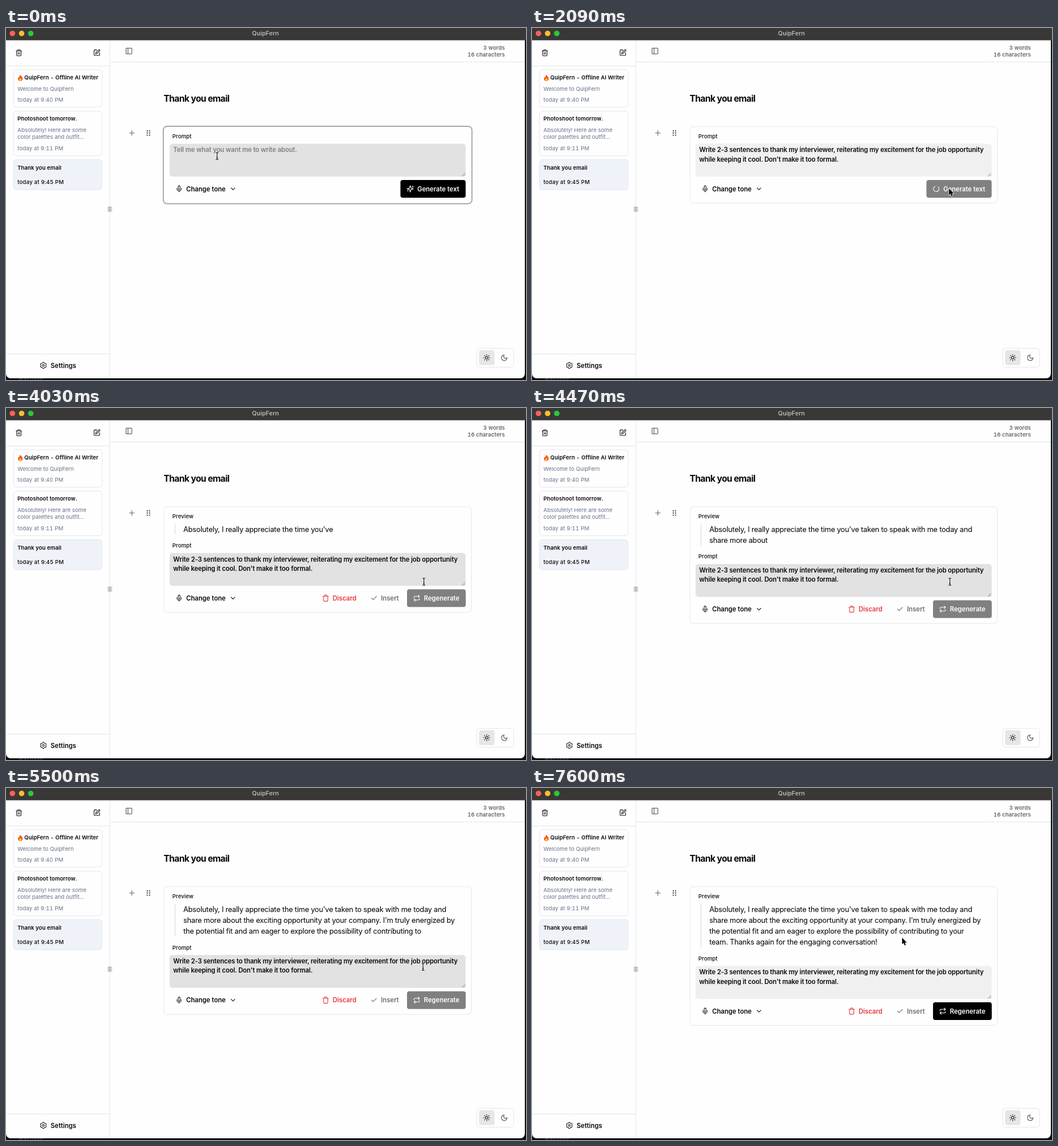
These frames come from a looping animation (909x616 px, 8000 ms). An HTML page:

```html
<!DOCTYPE html>
<html lang="en">
<head>
<meta charset="utf-8">
<title>QuipFern</title>
<style>
html, body { margin: 0; width: 100%; height: 100%; overflow: hidden; background: #111; }
svg { display: block; width: 100%; height: 100%; }
text { font-family: Inter, "Open Sans", sans-serif; white-space: pre; }
.small { font-size: 9.6px; letter-spacing: .004em; }
.time { font-size: 9.6px; letter-spacing: .018em; font-variant-numeric: tabular-nums; }
.label { font-size: 9.6px; font-weight: 500; letter-spacing: .008em; }
.bold { font-size: 9.6px; font-weight: 600; letter-spacing: .004em; font-variant-numeric: tabular-nums; }
.button { font-size: 11.2px; font-weight: 600; }
.field { font-size: 11.26px; font-weight: 600; letter-spacing: -.0123em; }
.reply { font-size: 12.7px; letter-spacing: -.0171em; }
.title { font-size: 15.5px; font-weight: 700; letter-spacing: -.6px; }
.bar { font-size: 10.6px; font-weight: 600; }
.now { font-weight: 500; }
</style>
</head>
<body>
<svg viewBox="0 0 909 616" preserveAspectRatio="none">
  <g id="shell"></g>
  <g id="panel"></g>
  <g id="pointer"></g>
</svg>
<script>
const LOOP = 8000;
const INK = '#0a0a0a', LINE = '#e4e6ea', SLATE = '#64708a', GRAY = '#6d6d6d', RED = '#e5383b';

const REPLY = ("Absolutely, I really appreciate the time you've taken to speak with me today and " +
  "share more about the exciting opportunity at your company. I'm truly energized by " +
  "the potential fit and am eager to explore the possibility of contributing to your " +
  "team. Thanks again for the engaging conversation!").split(' ');
const BREAKS = [0, 14, 27, 41, 48];
const PROMPT = ['Write 2-3 sentences to thank my interviewer, reiterating my excitement for the job opportunity',
  "while keeping it cool. Don't make it too formal."];

// Tracks hold each value until the next time: [time, value...]
const WORDS = [[0, 0], [3730, 2], [3880, 5], [4020, 7], [4170, 10], [4320, 13], [4470, 17], [4620, 20],
  [4770, 23], [4910, 26], [5050, 28], [5200, 32], [5350, 36], [5500, 40], [5650, 43], [5800, 46], [5950, 48]];
const POINTER = [[0, 369, 224, 'beam'], [1040, 412, 235, 'beam'], [1190, 470, 240, 'beam'], [1340, 562, 246, 'beam'],
  [1490, 645, 252, 'beam'], [1640, 702, 270, 'arrow'], [1790, 729, 281, 'arrow'], [3280, 730, 289, 'arrow'],
  [3430, 729, 296, 'arrow'], [3580, 729, 301.5, 'arrow'], [3730, 730.5, 304, 'beam'], [5050, 730.5, 306, 'beam'],
  [5500, 729, 313, 'beam'], [5650, 726, 328, 'beam'], [5800, 720, 350, 'beam'], [5950, 713.5, 371.5, 'arrow'],
  [7450, 662, 287, 'arrow'], [7600, 647, 262, 'arrow']];
const CARET = [[0], [150, 293, 214], [600, 538, 230], [750, 293, 245], [1490], [2090]];

const hold = (track, t) => track.filter(k => k[0] <= t).pop().slice(1);
const text = (x, y, s, cls, fill = INK, anchor = 'start') =>
  `<text x="${x}" y="${y}" class="${cls}" fill="${fill}" text-anchor="${anchor}">${s}</text>`;
const rect = (x, y, w, h, r, fill, stroke = 'none', sw = 1) =>
  `<rect x="${x}" y="${y}" width="${w}" height="${h}" rx="${r}" fill="${fill}" stroke="${stroke}" stroke-width="${sw}"/>`;
const line = (d, color = LINE, sw = 1) => `<path d="${d}" fill="none" stroke="${color}" stroke-width="${sw}"/>`;
const dot = (x, y, r, fill) => `<circle cx="${x}" cy="${y}" r="${r}" fill="${fill}"/>`;
const ring = (x, y, r) => `M${x - r} ${y}a${r} ${r} 0 1 0 ${2 * r} 0a${r} ${r} 0 1 0 ${-2 * r} 0`;

const ICON = {
  trash: 'M3 6h18M19 6v14a2 2 0 0 1-2 2H7a2 2 0 0 1-2-2V6M8 6V4a2 2 0 0 1 2-2h4a2 2 0 0 1 2 2v2M10 11v6M14 11v6',
  bin: 'M3 6h18M19 6v14a2 2 0 0 1-2 2H7a2 2 0 0 1-2-2V6M8 6V4a2 2 0 0 1 2-2h4a2 2 0 0 1 2 2v2',
  edit: 'M12 3H5a2 2 0 0 0-2 2v14a2 2 0 0 0 2 2h14a2 2 0 0 0 2-2v-7M18.4 2.6a2.1 2.1 0 0 1 3 3L12 15l-4 1 1-4Z',
  side: 'M5 3h14a2 2 0 0 1 2 2v14a2 2 0 0 1-2 2H5a2 2 0 0 1-2-2V5a2 2 0 0 1 2-2ZM9 3v18',
  mic: 'M12 2a3 3 0 0 0-3 3v7a3 3 0 0 0 6 0V5a3 3 0 0 0-3-3ZM19 10v2a7 7 0 0 1-14 0v-2M12 19v3',
  down: 'M6 9l6 6 6-6',
  plus: 'M5 12h14M12 5v14',
  check: 'M20 6L9 17l-5-5',
  repeat: 'M17 2l4 4-4 4M3 11v-1a4 4 0 0 1 4-4h14M7 22l-4-4 4-4M21 13v1a4 4 0 0 1-4 4H3',
  spinner: 'M21 12a9 9 0 1 1-6.2-8.56',
  spark: 'M9.9 15.5A2 2 0 0 0 8.5 14.1l-6.1-1.6a.5.5 0 0 1 0-1L8.5 9.9A2 2 0 0 0 9.9 8.5l1.6-6.1a.5.5 0 0 1 1 0L14.1 8.5' +
    'A2 2 0 0 0 15.5 9.9l6.1 1.6a.5.5 0 0 1 0 1L15.5 14.1a2 2 0 0 0-1.4 1.4l-1.6 6.1a.5.5 0 0 1-1 0ZM20 3v4M22 5h-4M4 17v2M5 18H3',
  moon: 'M12 3a6 6 0 0 0 9 9 9 9 0 1 1-9-9Z',
  sun: ring(12, 12, 4) + polar(8, (a, p) => `M${p(8, a)}L${p(10, a)}`),
  gear: ring(12, 12, 3) + 'M' + polar(72, (a, p) => p(8.9 + 1.2 * Math.cos(6 * a), a) + ' ') + 'Z'
};

function polar(n, draw) {
  const point = (r, a) => `${(12 + r * Math.sin(a)).toFixed(2)} ${(12 - r * Math.cos(a)).toFixed(2)}`;
  return Array.from({ length: n }, (_, i) => draw(i * 2 * Math.PI / n, point)).join('');
}

function icon(name, x, y, size = 12.9, color = INK, sw = 2, turn = 0) {
  return `<path d="${ICON[name]}" transform="translate(${x} ${y}) rotate(${turn}) scale(${size / 24}) translate(-12 -12)"
    fill="none" stroke="${color}" stroke-width="${sw}" stroke-linecap="round" stroke-linejoin="round"/>`;
}

function grip(x, y, dx, dy, r, color) {
  let out = '';
  for (let i = 0; i < 6; i++) out += dot(x + (i % 2 - .5) * dx, y + ((i >> 1) - 1) * dy, r, color);
  return out;
}

function shell() {
  const flame = `<path d="M25.4 82c.6 2 3.7 3.6 3.7 6.5a4 4 0 0 1-8.2.2c0-1.7.7-2.7 1.3-3.5.2 1 .6 1.5 1.2 1.7-.3-2 .5-3.8 2-4.9Z" fill="#f4511e"/>
    <path d="M25.3 87c1.3 1.3 2 2.2 2 3.3a2.2 2.2 0 0 1-4.5 0c0-1.2.7-1.8 1.2-2.3.2.5.5.7.8.8 0-.7.1-1.2.5-1.8Z" fill="#ffc02e"/>`;
  return rect(0, 0, 909, 616, 0, '#0d0d0d') +
    text(14, 617, '.. and more', 'small', '#555') +
    '<path d="M0 0H907V605a8 8 0 0 1-8 8H8a8 8 0 0 1-8-8Z" fill="#fefefe"/>' +
    rect(0, 0, 909, 21.5, 0, '#393836') +
    dot(11.3, 9.5, 4.8, '#ff5f57') + dot(27.3, 9.5, 4.8, '#febc2e') + dot(43.3, 9.5, 4.8, '#28c840') +
    text(453.5, 12.8, 'QuipFern', 'bar', '#b8b7b6', 'middle') +
    line('M181.5 22V613M0 66.5H181M182 59.5H907M0 570.5H181') +
    icon('trash', 22.5, 43.3) + icon('edit', 158.8, 43.2) + icon('side', 214.9, 40.3, 13.5, '#444', 1.8) +
    rect(13, 73, 155, 65.5, 5, '#fefefe', LINE) +
    flame + text(32, 90.3, 'QuipFern - Offline AI Writer', 'bold') +
    text(20, 109.5, 'Welcome to QuipFern', 'small', SLATE) +
    text(20, 128.9, 'today at 9:40 PM', 'time', SLATE) +
    rect(13, 145.5, 155, 78, 5, '#fefefe', LINE) +
    text(20, 162.4, 'Photoshoot tomorrow.', 'bold') +
    text(20, 181.6, 'Absolutely! Here are some', 'small', SLATE) +
    text(20, 194.4, 'color palettes and outfit…', 'small', SLATE) +
    text(20, 213.9, 'today at 9:11 PM', 'time', SLATE) +
    rect(13, 230.5, 155, 52.5, 5, '#eff3f9', '#e1e6ee') +
    text(20, 247.5, 'Thank you email', 'bold') +
    text(20, 273, 'today at 9:45 PM', 'time now') +
    rect(177, 311.5, 9, 11, 2, '#e2e6ec') + grip(181.5, 317, 2.6, 2.7, .75, '#444') +
    icon('gear', 65.3, 590.4, 13, INK, 1.9) + text(78, 594.5, 'Settings', 'button') +
    text(872, 37.5, '3 words', 'bold', '#666', 'end') + text(872, 50, '16 characters', 'bold', '#666', 'end') +
    text(275.5, 128.6, 'Thank you email', 'title') +
    icon('plus', 220, 183.8, 14.5, '#666', 1.9) + grip(249, 183.8, 4, 3.8, 1.2, '#555') +
    rect(823, 560.5, 64.5, 33, 5, '#fefefe', LINE) + rect(827, 564, 27, 26, 4, '#e6e6e6') +
    icon('sun', 840.4, 577, 13.2) + icon('moon', 871, 577, 13.2, '#555');
}

function preview(count, rows) {
  let out = text(290.8, 192.7, 'Preview', 'label') + rect(294.7, 202.5, 1.7, rows * 19.25 - .5, 0, LINE);
  for (let i = 0; i < rows; i++)
    out += text(310, 216.6 + i * 19.25, REPLY.slice(BREAKS[i], Math.min(BREAKS[i + 1], count)).join(' '), 'reply', '#000');
  return out;
}

function field(t, mode) {
  const focused = t >= 150 && t < 2090;
  const base = focused ? rect(285.5, 202, 518.5, 58.5, 5, '#fefefe', INK, 1.3)
    : rect(286, 202.5, 517.5, 57.5, 5, mode === 'beam' ? '#e2e2e2' : '#f0f0f0');
  const words = t < 600 ? text(292.3, 217.4, 'Tell me what you want me to write about.', 'field', '#808080')
    : PROMPT.map((s, i) => text(292.3, 217.4 + i * 16.1, s, 'field')).join('');
  const [x, y] = hold(CARET, t);
  return base + words + line('M797 259.5L802.5 254M800.3 259.5L802.5 257.3', '#666', .8) +
    (x ? line(`M${x} ${y - 7}v14`, INK, 1) : '');
}

function actions(t, rows) {
  const y = 281.5, base = 285.5;
  const common = icon('mic', 302.6, y) + text(315, base, 'Change tone', 'button') + icon('down', 396.8, y, 13);
  if (!rows) {
    const busy = t >= 2090, tick = Math.floor((t + 8) / 149) * 149;
    const fill = busy ? '#808080' : t >= 1640 ? '#1d1d1d' : '#000';
    return common + rect(689.5, 266, 114, 31, 4, fill) +
      (busy ? icon('spinner', 706.6, y, 13, '#fff', 2, 130 + (tick - 3576) * .36) : icon('spark', 706.6, y, 12.9, '#fff')) +
      text(719, base, 'Generate text', 'button', '#fff');
  }
  return common + icon('bin', 558.8, y, 12.9, RED) + text(571, base, 'Discard', 'button', RED) +
    icon('check', 643.4, y, 12.9, GRAY) + text(655.5, base, 'Insert', 'button', GRAY) +
    rect(701, 266, 102.7, 31, 4, t < 5950 ? '#808080' : '#000') +
    icon('repeat', 718, y, 12.9, '#fff') + text(730.5, base, 'Regenerate', 'button', '#fff');
}

function panel(t, mode) {
  const [count] = hold(WORDS, t);
  const rows = count ? BREAKS.findIndex(b => b >= count) : 0;
  const drop = rows ? 32 + rows * 19.25 : 0;
  const card = t < 150 ? rect(275, 172, 539.5, 135.5, 6.5, '#fefefe', '#a9a9a9', 2)
    : rect(276, 172.8, 537.5, 133.7 + drop, 6, '#fefefe', LINE);
  return card + (rows ? preview(count, rows) : '') +
    `<g transform="translate(0 ${drop})">` +
    text(290.8, 192.9, 'Prompt', 'label') + field(t, mode) + actions(t, rows) + '</g>';
}

function pointer([x, y, mode]) {
  const beam = 'M-2.5-6.2Q0-6.2 0-4.5Q0-6.2 2.5-6.2M0-4.5V4.5M-2.5 6.2Q0 6.2 0 4.5Q0 6.2 2.5 6.2M-1.2 2.5H1.2';
  const arrow = 'M0 0V11.5L2.6 9.1L4.5 13.4L6.4 12.6L4.6 8.4H8.2Z';
  const shape = mode === 'beam'
    ? line(beam, '#fff', 2.2) + line(beam, '#000', 1.1)
    : `<path d="${arrow}" fill="#000" stroke="#fff" stroke-width="1.3" paint-order="stroke" stroke-linejoin="round"/>`;
  return `<g transform="translate(${x} ${y})">${shape}</g>`;
}

const shown = {};
function put(id, html) {
  if (shown[id] === html) return;
  shown[id] = html;
  document.getElementById(id).innerHTML = html;
}

function draw(now) {
  const t = now % LOOP, at = hold(POINTER, t);
  put('panel', panel(t, at[2]));
  put('pointer', pointer(at));
}

put('shell', shell());
draw(0);
const start = performance.now();
(function loop() {
  draw(performance.now() - start);
  requestAnimationFrame(loop);
})();
</script>
</body>
</html>
```
